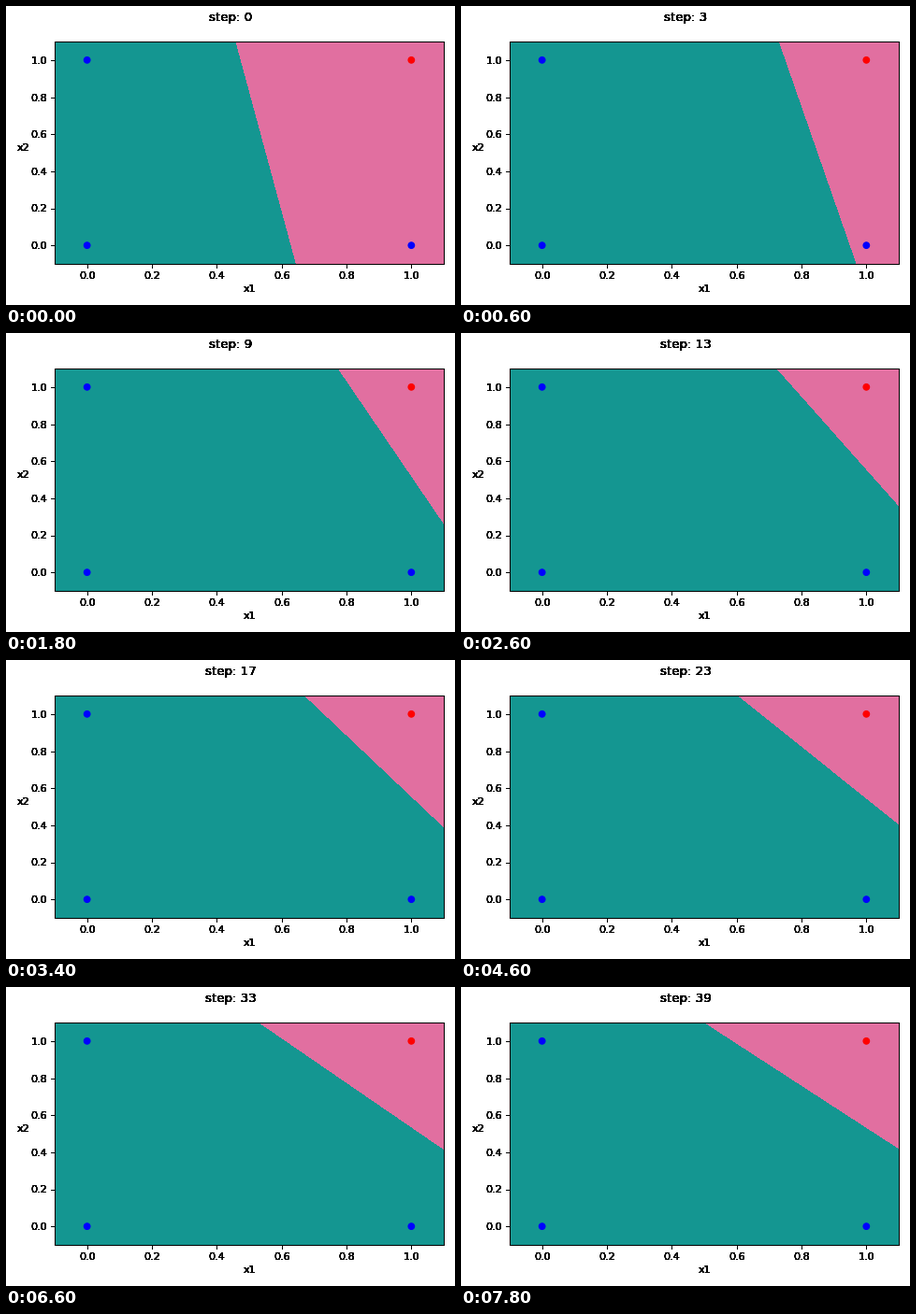
A matplotlib script for the animation above (8 s loop, 480 by 320 pixels).

```python
import numpy as np
import matplotlib.pyplot as plt
from matplotlib.animation import FuncAnimation

W, H, DPI = 480, 320, 80
STEPS, INTERVAL = 40, 200
LAYERS = 10
LOW, HIGH = -0.1, 1.1
TEAL, PINK = "#149691", "#e16fa0"


def boundary(step):
    """Base and ratio of the line x1 = base - ratio * x2."""
    base = 0.63 + step / (6.15 + 1.07 * step - 0.001 * step**2)
    ratio = 0.155 + step**2 / (160 + 12 * step + 0.965 * step**2)
    return base, ratio


def add_axes():
    ax = fig.add_axes([52 / W, 44 / H, 416 / W, 238 / H])
    ticks = np.linspace(0, 1, 6)
    ax.set(xlim=(LOW, HIGH), ylim=(LOW, HIGH), xticks=ticks, yticks=ticks,
           xlabel="x1", facecolor="none")
    fig.text(19 / W, 163 / H, "x2", ha="center", va="bottom")
    return ax


def add_title():
    return fig.text(0.5, 0.98, "", size="large", ha="center", va="top")


plt.rcParams["font.family"] = "DejaVu Sans"
fig = plt.figure(figsize=(W / DPI, H / DPI), dpi=DPI, facecolor="white")

# Stacked copies give the lettering its heavy edges
ax = [add_axes() for _ in range(LAYERS)][0]
titles = [add_title() for _ in range(LAYERS)]
ax.set_facecolor(TEAL)
region, = ax.fill([0, 1, 1], [0, 0, 1], color=PINK, lw=0,
                  antialiased=False, zorder=1)
ax.scatter([0, 0, 1, 1], [0, 1, 0, 1], c=["blue"] * 3 + ["red"], zorder=3)


def draw(step):
    base, ratio = boundary(step)
    top, bottom = base - ratio * HIGH, base - ratio * LOW
    right = max(bottom, HIGH)
    region.set_xy([(top, HIGH), (bottom, LOW), (right, LOW), (right, HIGH)])
    for title in titles:
        title.set_text(f"step: {step}")
    return [region, *titles]


anim = FuncAnimation(fig, draw, frames=STEPS, interval=INTERVAL,
                     repeat=True, repeat_delay=0, blit=False)
plt.show()
```
